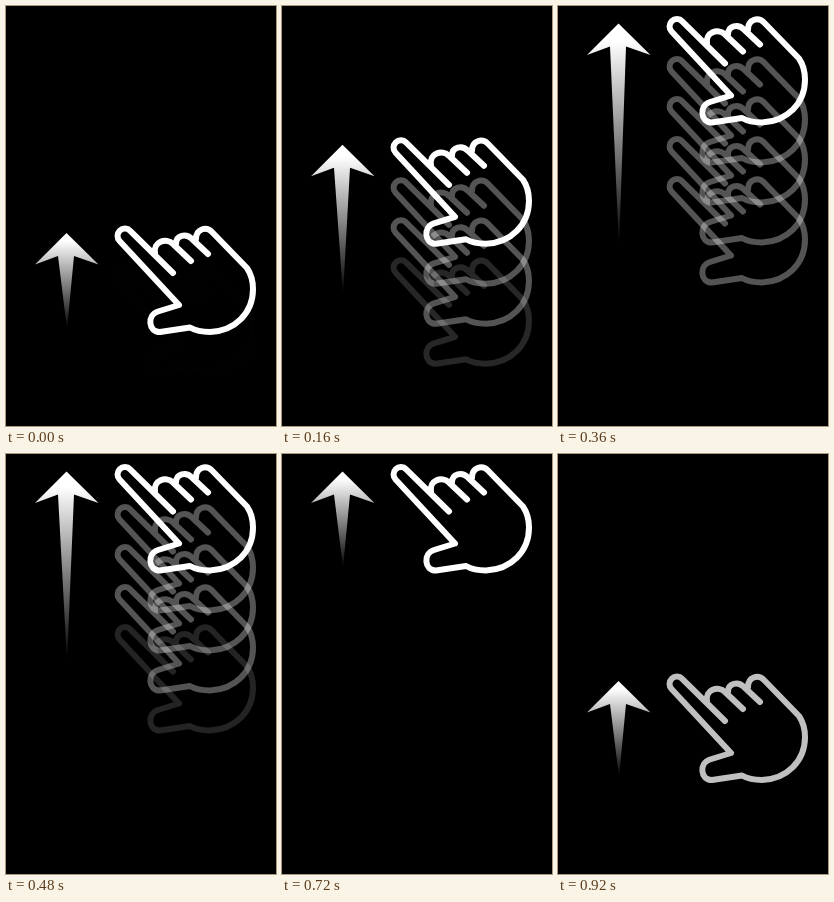
Recreate the animation shown at these times as an HTML page with a canvas. Size 270x420 px, loop 960 ms.

```html
<!DOCTYPE html>
<html>
<head>
<meta charset="utf-8">
<style>
  html, body { margin: 0; width: 100%; height: 100%; overflow: hidden; background: #000; }
  canvas { display: block; width: 270px; height: 420px; }
</style>
</head>
<body>
<canvas id="stage" width="270" height="420"></canvas>
<script>
const ctx = document.getElementById('stage').getContext('2d');
const LOOP = 960, RISE_END = 360, HOLD_END = 720, TRAVEL = 209.5, GHOST_GAP = 40;

const hand = new Path2D(`
  M167 267 L124.2 224.8 A7.3 7.3 0 0 0 113.6 235 L173 299 L152 305.5
  C141 309 142 326 154 326 L184 321.5 C190 325 197 326 204 326
  C229 325 247 307 247 283 C247 275 245 268 241 262 L206 226
  C200 220 190 223 190 233
  M149 247 C147 236 160 231 167 238 L185 255
  M170 238 C170 229 180 227 186 233 L202 248`);

// Fade-in start and fade-out start of each trailing copy, nearest first
const ghosts = [[0, 630], [55, 590], [115, 510], [215, 430]];

const ramp = (t, from, to) => Math.min(1, Math.max(0, (t - from) / (to - from)));
const ease = (t, from, to) => { const u = ramp(t, from, to); return u * u * (3 - 2 * u); };

function drawHand(y, alpha) {
  if (alpha <= 0) return;
  ctx.save();
  ctx.translate(0, y);
  ctx.globalAlpha = alpha;
  ctx.stroke(hand);
  ctx.restore();
}

function drawArrow(y, length, alpha) {
  ctx.save();
  ctx.translate(60.5, 227 + y);
  ctx.globalAlpha = alpha;
  const fade = ctx.createLinearGradient(0, 0, 0, length);
  fade.addColorStop(0.08, '#fff');
  fade.addColorStop(1, 'rgba(255,255,255,0)');
  ctx.fillStyle = fade;
  ctx.fill(new Path2D(`M0 0 L32 31.5 L7.5 23 L0.5 ${length} L-8.5 23 L-31.5 31.5 Z`));
  ctx.restore();
}

function draw(t) {
  ctx.fillStyle = '#000';
  ctx.fillRect(0, 0, 270, 420);
  ctx.strokeStyle = '#fff';
  ctx.lineWidth = 6;
  ctx.lineCap = ctx.lineJoin = 'round';

  const y = t < 840 ? -TRAVEL * ease(t, 0, RISE_END) : 0;
  const arrowY = t < 800 ? -TRAVEL * ease(t, 0, RISE_END) : 0;
  const stretch = ease(t, 0, RISE_END) - ease(t, RISE_END, HOLD_END);

  drawArrow(arrowY, 96 + 128 * stretch, 1 - ease(t, HOLD_END, 800) + ease(t, 800, 900));
  ghosts.forEach(([start, end], i) =>
    drawHand(y + GHOST_GAP * (i + 1), 0.33 * (ramp(t, start, start + 100) - ramp(t, end, end + 90))));
  drawHand(y, 1 - ease(t, HOLD_END, 840) + ease(t, 840, LOOP));
}

const begin = performance.now();
(function tick() {
  draw((performance.now() - begin) % LOOP);
  requestAnimationFrame(tick);
})();
</script>
</body>
</html>
```
